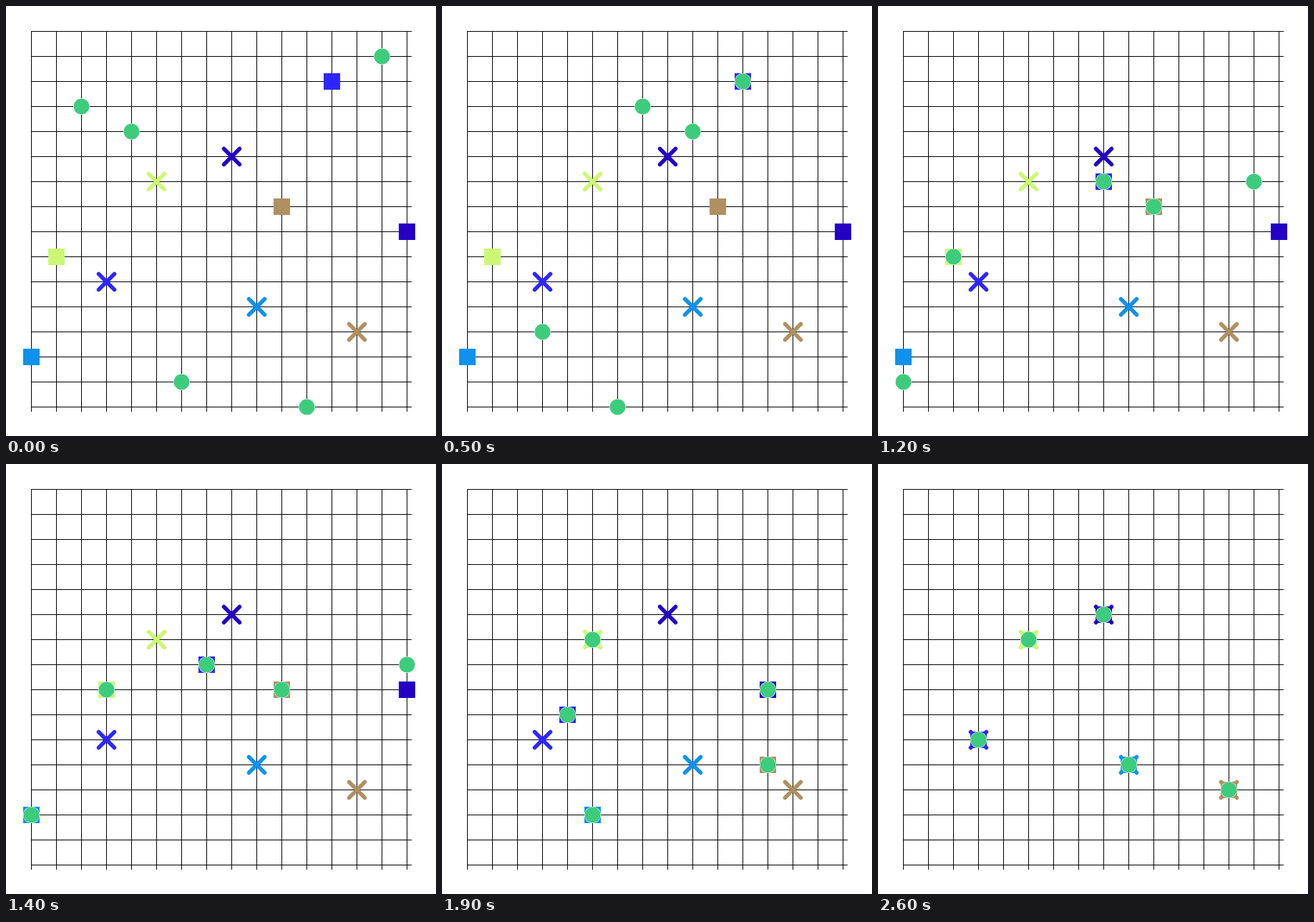
Write an HTML page with a canvas that moves like this. It is 601 by 601 pixels and loops after 2.7 s.

```html
<!DOCTYPE html>
<html lang="en">
<head>
<meta charset="utf-8">
<title>Grid carriers</title>
<style>
  html, body { margin: 0; width: 100%; height: 100%; overflow: hidden; background: #fff; }
  canvas { display: block; width: 601px; height: 601px; }
</style>
</head>
<body>
<canvas id="stage" width="601" height="601"></canvas>
<script>
const CELL = 35, LINES = 16, STEP_MS = 100, STEPS = 27;
const GREEN = '#3dcc7c';
const ctx = document.getElementById('stage').getContext('2d');

// Each carrier walks to its box, spends one step lifting it, then walks to its goal.
const carriers = [
  { start: [2, 3],   box: [10, 7], goal: [13, 12], color: '#b09060' },
  { start: [4, 4],   box: [15, 8], goal: [8, 5],   color: '#2400c4' },
  { start: [14, 1],  box: [12, 2], goal: [3, 10],  color: '#2e26ff' },
  { start: [6, 14],  box: [1, 9],  goal: [5, 6],   color: '#ccf774' },
  { start: [11, 15], box: [0, 13], goal: [9, 11],  color: '#0e92ee' }
];

// Close the longer gap first; ties resolve right, down, left, up.
function advance([x, y], [tx, ty]) {
  const dx = tx - x, dy = ty - y;
  const gapX = Math.abs(dx), gapY = Math.abs(dy);
  const horizontal = gapX > gapY || (gapX === gapY && (dx > 0 || dy < 0));
  return horizontal ? [x + Math.sign(dx), y] : [x, y + Math.sign(dy)];
}

const same = (a, b) => a[0] === b[0] && a[1] === b[1];

function plan({ start, box, goal }) {
  const states = [];
  let pos = start, load = box, carrying = false;
  for (let i = 0; i < STEPS; i++) {
    states.push({ pos, load });
    if (carrying) {
      if (!same(pos, goal)) pos = advance(pos, goal);
      load = pos;
    } else if (same(pos, box)) {
      carrying = true;
    } else {
      pos = advance(pos, box);
    }
  }
  return states;
}

const plans = carriers.map(plan);
const center = n => (n + 1) * CELL + 0.5;

function drawGrid() {
  ctx.fillStyle = '#fff';
  ctx.fillRect(0, 0, 601, 601);
  ctx.fillStyle = '#000';
  for (let i = 1; i <= LINES; i++) {
    ctx.fillRect(i * CELL, CELL, 1, 532);
    ctx.fillRect(CELL, i * CELL, 532, 1);
  }
}

function drawCross([col, row], color) {
  const x = center(col), y = center(row), r = 11;
  ctx.strokeStyle = color;
  ctx.lineWidth = 5.5;
  ctx.lineCap = 'round';
  ctx.beginPath();
  ctx.moveTo(x - r, y - r);
  ctx.lineTo(x + r, y + r);
  ctx.moveTo(x + r, y - r);
  ctx.lineTo(x - r, y + r);
  ctx.stroke();
}

function drawBox([col, row], color) {
  ctx.fillStyle = color;
  ctx.fillRect(center(col) - 11.5, center(row) - 11.5, 23, 23);
}

function drawDot([col, row]) {
  for (const [r, color] of [[11.5, '#fff'], [11, GREEN]]) {
    ctx.fillStyle = color;
    ctx.beginPath();
    ctx.arc(center(col), center(row), r, 0, Math.PI * 2);
    ctx.fill();
  }
}

function draw(step) {
  drawGrid();
  carriers.forEach(c => drawCross(c.goal, c.color));
  carriers.forEach((c, i) => drawBox(plans[i][step].load, c.color));
  plans.forEach(p => drawDot(p[step].pos));
}

const began = performance.now();
let shown = 0;
draw(0);

function tick() {
  const step = Math.floor((performance.now() - began) / STEP_MS) % STEPS;
  if (step !== shown) draw(shown = step);
  requestAnimationFrame(tick);
}
requestAnimationFrame(tick);
</script>
</body>
</html>
```
